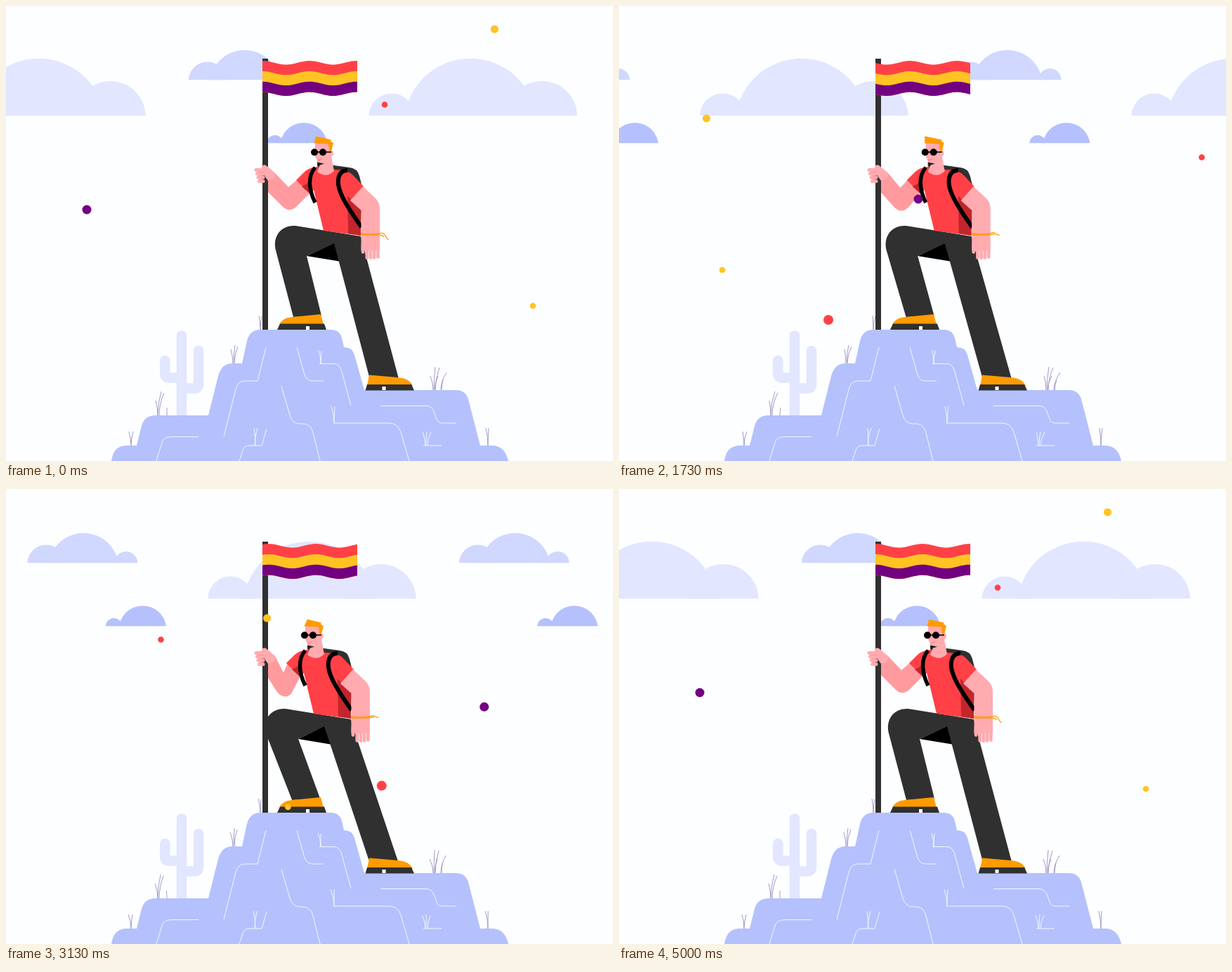
Write an HTML page with a canvas that moves like this. It is 864x648 px and loops after 5060 ms.

```html
<!DOCTYPE html>
<html lang="en">
<head>
<meta charset="utf-8">
<title>Summit</title>
<style>
html, body { margin: 0; width: 100%; height: 100%; overflow: hidden; background: #fdfeff; }
canvas { display: block; width: 864px; height: 648px; }
</style>
</head>
<body>
<canvas id="stage" width="864" height="648"></canvas>
<script>
const ctx = document.getElementById('stage').getContext('2d');
const TAU = Math.PI * 2, FRAMES = 75, LOOP = 5060;
const DARK = '#303030', ORANGE = '#ff9b00', SKIN = '#ffabb0', SKIN2 = '#ff9b9f',
  RED = '#ff4147', SHADE = '#c2262c', YELLOW = '#ffc423', PURPLE = '#730080',
  ROCK = '#b4c1fd', PALE = '#e2e6ff';

function fill(color, d) {
  ctx.fillStyle = color;
  ctx.fill(new Path2D(d));
}
function line(color, width, d, cap = 'butt') {
  ctx.strokeStyle = color;
  ctx.lineWidth = width;
  ctx.lineCap = cap;
  ctx.stroke(new Path2D(d));
}
function disc(color, x, y, r) {
  ctx.fillStyle = color;
  ctx.beginPath();
  ctx.arc(x, y, r, 0, TAU);
  ctx.fill();
}
const mod = (a, n) => ((a % n) + n) % n;

// Clouds: circles [x, y, r] cut off at a flat base, repeating every SPAN pixels
const SPAN = 614.4;
const clouds = [
  { color: PALE, base: 156.3, bumps: [[549, 157, 32.5], [661, 169, 94.3], [763, 157, 50]] },
  { color: '#d0d8ff', base: 105.3, bumps: [[286.7, 106.5, 27], [339.7, 112.7, 50], [400.2, 105.5, 16.5]] },
  { color: ROCK, base: 195.2, bumps: [[382.9, 195.5, 11.5], [423.9, 200, 33.8]] }
];
function drawClouds(t) {
  for (const { color, base, bumps } of clouds) {
    ctx.save();
    ctx.beginPath();
    ctx.rect(0, 0, 864, base);
    ctx.clip();
    for (const lap of [t / 5 - 1, t / 5])
      for (const [x, y, r] of bumps) disc(color, x + lap * SPAN, y, r);
    ctx.restore();
  }
}

// Blades: [tip x, tip y, root x, root y]
const darkGrass = [
  [359, 441, 362, 461], [363, 442, 362, 461],
  [319, 489, 323, 509], [325, 483, 324, 509], [329, 485, 325, 509],
  [212, 562, 216, 583], [220, 549, 216, 583], [224, 551, 218, 583], [228, 572, 229, 583],
  [174, 606, 178, 626], [180, 606, 178, 626],
  [603, 527, 608, 547], [610, 514, 609, 547], [616, 515, 611, 547],
  [614, 527, 610, 547], [626, 522, 619, 547], [621, 533, 620, 547],
  [682, 601, 686, 626], [686, 601, 686, 626]
];
const lightGrass = [
  [444, 490, 448, 509], [448, 491, 448, 509],
  [462, 570, 467, 594], [467, 570, 467, 594],
  [352, 601, 355, 626], [357, 601, 354, 626],
  [592, 607, 597, 626], [598, 606, 598, 626], [604, 607, 600, 626]
];
function drawGrass(blades, color, t) {
  const bend = 1 + 1.2 * Math.sin(TAU * t / 5);
  for (const [x, y, rx, ry] of blades)
    line(color, 1, `M${rx} ${ry}Q${rx} ${(y + ry) / 2} ${x + bend} ${y}`);
}

function drawCactus() {
  line(PALE, 14.5, 'M250 469.5V584', 'round');
  line(PALE, 14.5, 'M226.3 505V524Q226.3 529.5 232 529.5H250', 'round');
  line(PALE, 14.5, 'M274 491V539Q274 544.5 268 544.5H250', 'round');
}

function drawRock(t) {
  fill(ROCK, `M150 648Q153 626 172 626H186L193 598Q197 583 213 583H288L302 527Q307 509 322 509H336
    L343 477Q347 461 362 461H462Q475 461 478 473L481 486Q493 486 496 497L510 547H640Q654 547 658 560
    L675 626H692Q710 626 715 648Z`);
  line('#f4f6ff', 1, `M370 486L358 534H340Q330 534 327 546L310 613
    M414 486L424 522Q427 534 436 534H452
    M392 541L404 583Q408 595 418 595H424Q434 596 437 608L447 648
    M446 509.5H467Q475 509.5 478 521L491 569
    M533 569.5H598Q607 569.5 610 580L613 588Q614 594 622 594H641
    M466 594H545Q558 594 562 607L574 648
    M274 613.5H236Q224 613.5 222 622L214 648
    M594 626H620M332 648L336 636Q338 626 346 626H364L371 602`);
  drawGrass(lightGrass, '#f4f6ff', t);
}

function drawFlag(t) {
  const bands = [[RED, 80.8], [YELLOW, 95.6], [PURPLE, 110.4]];
  const wave = x => -2.7 * Math.cos(TAU * ((x - 432) / 67 - t));
  for (const [color, top] of bands) {
    ctx.fillStyle = color;
    ctx.beginPath();
    for (let x = 365; x <= 500.5; x += 1.5) ctx.lineTo(x, top + wave(x));
    for (let x = 500; x >= 365; x -= 1.5) ctx.lineTo(x, 125.3 + wave(x));
    ctx.fill();
  }
}

function drawBackArm(d) {
  fill(SKIN2, `M361 240L366 258L${393 - d * .5} ${285 + d * .3}
    Q${403 - d * .5} ${295 + d * .4} ${413 - d * .5} ${286 + d * .4}L${434 - d} 265L${416 - d} 246
    L${402 - d * .5} ${258 + d * .25}L383 238L372 229Z`);
}
function drawFist() {
  fill(SKIN, 'M364 229Q366 225 370 227L383 238Q384 244 379 247L373 249L364 236Z');
  for (let i = 0; i < 4; i++)
    line(SKIN, 5, `M${356 + i * 1.5} ${233.5 + i * 5.3}H366`, 'round');
  line('#ff8b91', .8, 'M357 236.5H367M359 241.8H367M360 247H367');
}

function drawLegs(d) {
  const k = d * .13;
  fill('#000', `M${428 - d * .85} 356L${468 - d} 337L${477 - d * .9} 364Z`);
  fill(DARK, `M${505 - d} 328L${415 - d} 313.5C${392 - d} 310 ${379 - d} 328 ${384 - d} 348
    L${409 - k} 443L${449 - k} 441L${428 - d * .85} 356L${467 - d} 338L${517 - k * .4} 528
    L${559 - k * .4} 531L${514 - d * .88} 362Z`);
  fill(ORANGE, 'M389 454Q393 444 407 443L448 439L452 454Z');
  fill(DARK, 'M386 461L390 452.5H453L456 461Z');
  fill(ORANGE, 'M514 541L517 525.5L558 529Q574 530 579 541Z');
  fill(DARK, 'M511.5 547.5L514 539H577L581 547.5Z');
  fill('#fff', 'M427 456h5v5h-5ZM535.5 542h5v5h-5Z');
}

function drawHead(t) {
  const tuft = 2 - 3 * Math.cos(TAU * (t - 1.3) / 5);
  fill(SKIN, `M440 193H464L463 205Q467 207 465.5 212L463 214L467 235Q456 246 443 236L447 226
    Q442 225 443 220L440 214Z`);
  fill('#222', 'M443 222.5L453 224.5L443 228Z');
  line('#ff6f78', 1, 'M443 219.5Q447 220 450 217');
  fill(ORANGE, `M438.5 195.5L${439 + tuft} 185.5L463 190.5L462 193L466 195L463 207L460 206L459 196.5Z`);
  line('#000', 1.6, 'M439 208H463');
  disc('#000', 439, 208.3, 5);
  disc('#000', 451, 208.3, 5);
}

function drawTorso(t) {
  fill(DARK, 'M445 224L489 230Q500 231 503 242L507 258L505 318L480 300L440 240Z');
  fill(RED, `M442 229Q431 230 424 237L413 248L431 266L438 262L452 320L505 327L490 278L509 257
    L494 241Q486 233 467 233Z`);
  fill(SHADE, 'M434 250L421 257L431 266L437 264Z');
  fill(SHADE, 'M486 270L487 324L505 327V290Z');
  line('#000', 5.5, 'M440 230C429 242 431 262 440 280');
  line('#000', 6, 'M486 234C472 234 470 250 476 265C482 282 496 300 506 315');
  drawHead(t);
  drawFrontArm(t);
}

function drawFrontArm(t) {
  fill(SKIN, 'M508 257L525 273Q532 279 532 289V348H505.5V291L490 277Z');
  for (const [x, y] of [[508, 350.5], [513.7, 358.5], [518.9, 358.8], [524.1, 358.5], [529.4, 357.5]])
    line(SKIN, 4.6, `M${x} 340V${y}`, 'round');
  const drop = 4 + 4 * Math.cos(TAU * t / 1.25);
  line(ORANGE, 1.3, `M505 323.8Q520 326 532 323.8Q537 322 540 ${324 + drop * .4}T545 ${325 + drop}
    M505 326H528Q535 325 538 ${325 + drop * .5}`);
}

// Drifting dots: colour, radius and places [x, y] at the key steps
const KEYS = [0, 11, 26, 38, 56, 65], WIDTH = 880, EDGE = 8;
const dots = [
  [PURPLE, 6.5, [[115, 290], [244.5, 321], [426, 275], [574, 289.5], [791.5, 324.5], [47, 295]]],
  [YELLOW, 5.6, [[695.5, 33], [823, 88.5], [124.5, 160], [266, 217], [475.5, 130], [571.5, 65]]],
  [RED, 4.3, [[539, 140.5], [664, 170], [829.5, 215.5], [114, 226.5], [322.5, 194.5], [423, 160]]],
  [YELLOW, 4.3, [[750, 427], [809, 401.5], [147, 376], [288.5, 438.5], [515.5, 453], [627.5, 421]]],
  [RED, 7, [[-8, 540], [135, 525], [298, 447], [433.5, 397], [636, 463], [738, 500]]]
];
for (const [, , path] of dots)
  path.forEach((p, i) => { if (i && p[0] < path[i - 1][0]) p[0] += WIDTH; });

function drawDots(step) {
  const n = KEYS.length;
  const time = j => KEYS[mod(j, n)] + FRAMES * Math.floor(j / n);
  let i = n - 1;
  while (KEYS[i] > step) i--;
  const span = time(i + 1) - time(i), u = (step - time(i)) / span;
  for (const [color, r, path] of dots) {
    const [x, y] = [0, 1].map(axis => {
      const at = j => path[mod(j, n)][axis] + (axis ? 0 : WIDTH * Math.floor(j / n));
      const slope = j => (at(j + 1) - at(j - 1)) / (time(j + 1) - time(j - 1)) * span;
      const v = 1 - u;
      return at(i) * (1 + 2 * u) * v * v + slope(i) * u * v * v
        + at(i + 1) * u * u * (3 - 2 * u) - slope(i + 1) * u * u * v;
    });
    disc(color, mod(x + EDGE, WIDTH) - EDGE, y, r);
  }
}

function draw(now) {
  // Fifteen steps a second; the last step repeats the first
  const step = Math.floor((now % LOOP + 9.9) * 15 / 1000) % FRAMES;
  const t = step / 15, u = t % 2.5;
  const sway = u < 2 ? 10 * (1 - Math.cos(Math.PI * u)) : 0;

  ctx.fillStyle = '#fdfeff';
  ctx.fillRect(0, 0, 864, 648);
  drawClouds(t);
  drawCactus();
  drawGrass(darkGrass, '#a49acb', t);
  drawRock(t);
  drawBackArm(sway);
  fill(DARK, 'M365 75h8v386h-8Z');
  drawFlag(t);
  drawFist();
  drawLegs(sway);
  ctx.save();
  ctx.translate(-sway, 0);
  drawTorso(t);
  ctx.restore();
  drawDots(step);
}

const start = performance.now();
function tick() {
  draw(performance.now() - start);
  requestAnimationFrame(tick);
}
tick();
</script>
</body>
</html>
```
